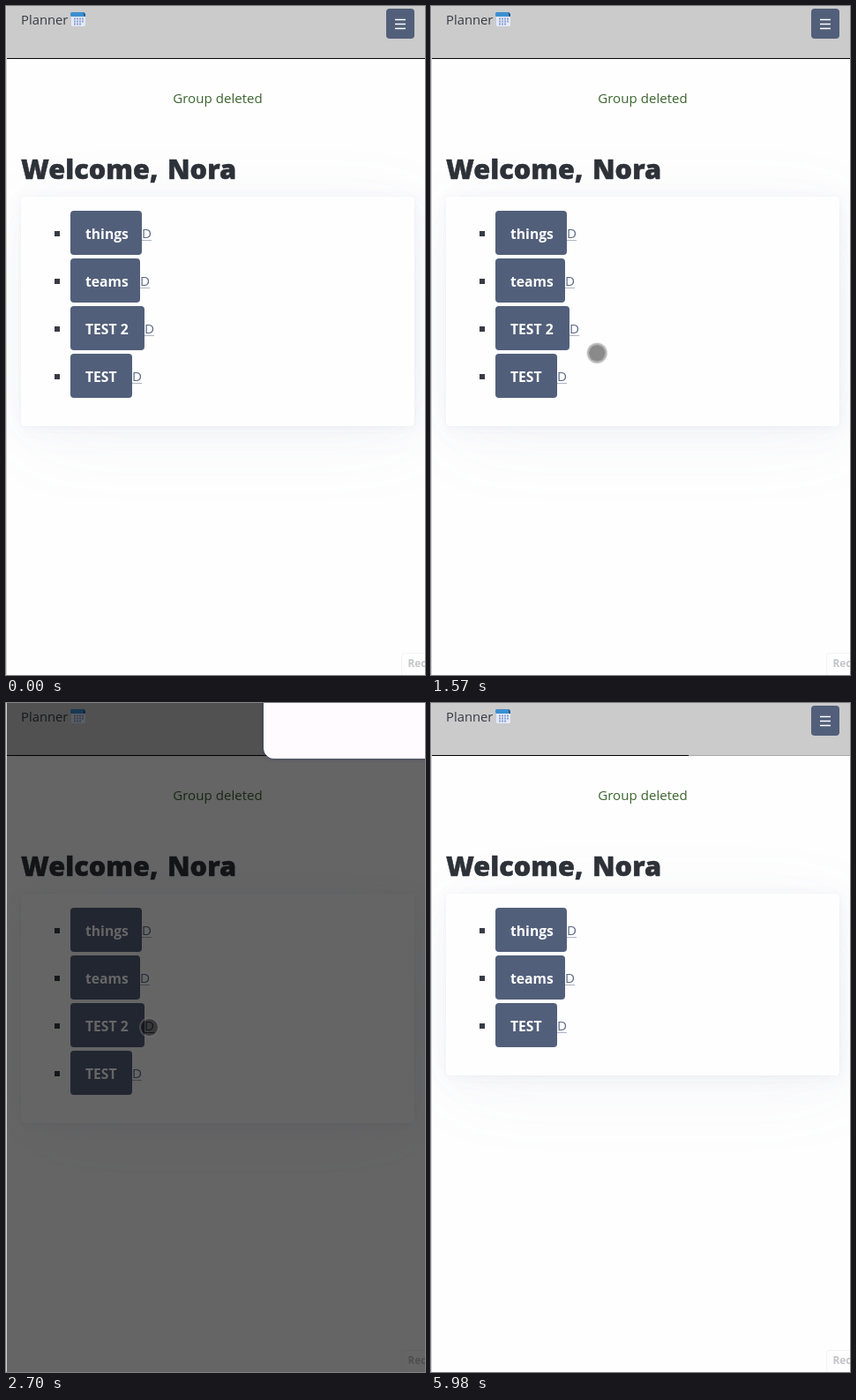
An HTML page that plays this animation: 475x758 px, repeating every 9.18 s.

```html
<!DOCTYPE html>
<html lang="en">
<head>
<meta charset="utf-8">
<title>Planner</title>
<style>
  :root { --loop: 9180ms; }
  html, body { margin: 0; width: 100%; height: 100%; overflow: hidden; }
  body {
    position: relative;
    background: #fefefe;
    color: #373c44;
    font: 15.1px/24px "Open Sans", "Noto Sans", sans-serif;
  }
  body > *, header > *, li > *, li::before, h1 span { position: absolute; }
  h1, ul, p { margin: 0; white-space: nowrap; }

  .edge { left: 0; top: 0; width: 1px; height: 758px; background: #d2d2d2; }
  header { left: 1px; top: 0; width: 474px; height: 59px; background: #cbcbcb; }
  .brand { left: 16px; top: 3px; font-size: 14.8px; }
  .calendar { left: 72px; top: 6px; }
  .menu { left: 430px; top: 3px; width: 32px; height: 34px; border-radius: 4px; background: #525f7a; }
  .menu svg { display: block; }
  .rule { top: 59px; height: 1px; background: #000; }
  .rule.left { left: 0; width: 291px; }
  .rule.right { left: 291px; width: 183px; animation: pale var(--loop) step-end infinite; }

  .notice { left: 1px; width: 478px; top: 92px; text-align: center; color: #3b6530; }
  h1 {
    left: 17px; top: 166px;
    color: #2d3138;
    font-size: 30.7px;
    font-weight: 800;
    line-height: 36px;
    -webkit-text-stroke: .5px #2d3138;
  }
  h1 span { left: 166px; top: 0; }

  ul {
    left: 17px; top: 216px; width: 446px;
    box-sizing: border-box;
    padding: 16px 0 28px;
    list-style: none;
    border-radius: 4px;
    background: #fefefe;
    box-shadow:
      .23px .46px 2.8px rgba(129, 145, 181, .017),
      .54px 1.07px 6.4px rgba(129, 145, 181, .024),
      1px 2px 12px rgba(129, 145, 181, .03),
      1.8px 3.6px 21.6px rgba(129, 145, 181, .036),
      3.3px 6.7px 40px rgba(129, 145, 181, .043),
      8px 16px 96px rgba(129, 145, 181, .06),
      0 0 0 1px rgba(129, 145, 181, .015);
  }
  li { position: relative; height: 54px; }
  li::before { content: ""; left: 38px; top: 23px; width: 6px; height: 6px; background: #373c44; }
  li b {
    left: 56px; top: 0; width: var(--w); height: 50px;
    box-sizing: border-box;
    padding: 14px 0 0 17px;
    border-radius: 4px;
    background: #525f7a;
    color: #fff;
    font-size: 15.7px;
  }
  li u {
    left: calc(56px + var(--w)); top: 13px;
    color: #5d6b89;
    text-decoration-color: rgba(93, 107, 137, .5);
    text-underline-offset: .125em;
  }
  .doomed { animation: remove var(--loop) step-end infinite; }
  .doomed u { animation: hover var(--loop) step-end infinite; }

  .tip {
    left: 448px; top: 733px; width: 40px; height: 30px;
    box-sizing: border-box;
    border: 1px solid #f4f4f5;
    border-radius: 3px;
    padding-left: 6.5px;
    color: #c3c4c8;
    font-size: 11.8px;
    font-weight: 700;
    line-height: 21px;
  }

  .dim {
    left: 1px; top: 0; width: 474px; height: 758px;
    background: #000;
    animation: dim var(--loop) step-end infinite;
  }
  .dialog {
    left: 292px; top: -20px; width: 220px; height: 83px;
    border-radius: 12px;
    background: #fffbff;
    box-shadow: 0 0 4px rgba(40, 50, 100, .7);
    animation: dialog var(--loop) step-end infinite;
  }
  .pointer {
    left: -12px; top: -12px; width: 24px; height: 24px;
    animation: travel var(--loop) infinite, show var(--loop) step-end infinite;
  }
  .pointer i {
    position: absolute; inset: .5px;
    box-sizing: border-box;
    border: 2px solid rgba(112, 112, 112, .48);
    border-radius: 50%;
    background: rgba(10, 10, 10, .47) padding-box;
    animation: click var(--loop) step-end infinite;
  }

  @keyframes pale { 0% { background: #000; } 59.91%, 100% { background: #a6a6ae; } }
  @keyframes remove {
    0% { height: 54px; visibility: visible; }
    65.14%, 100% { height: 0; visibility: hidden; }
  }
  @keyframes hover {
    0%, 65.14%, 100% { color: #5d6b89; text-decoration-color: rgba(93, 107, 137, .5); }
    21.35% { color: #48536b; text-decoration-color: #48536b; }
  }
  @keyframes dim { 0%, 58.6%, 100% { opacity: 0; } 27.12% { opacity: .6; } }
  @keyframes dialog {
    0%, 59.91%, 100% { opacity: 0; transform: none; }
    27.88% { opacity: .35; transform: translateY(-8px); }
    28.64% { opacity: .8; transform: translateY(-3px); }
    29.41% { opacity: 1; transform: none; }
    58.6% { opacity: .95; transform: translateY(-5px); }
    59.25% { opacity: .45; transform: translateY(-9px); }
  }
  @keyframes show { 0%, 36.7%, 100% { visibility: hidden; } 1.3% { visibility: visible; } }
  @keyframes click {
    0%, 27.12%, 100% {
      inset: .5px;
      border-color: rgba(112, 112, 112, .48);
      background-color: rgba(10, 10, 10, .47);
    }
    25.7% {
      inset: 0;
      border-color: rgba(215, 210, 50, .65);
      background-color: rgba(190, 188, 0, .8);
    }
  }
  @keyframes travel {
    0%, 1.3% { transform: translate(436px, 752px); animation-timing-function: steps(3); }
    3.59% { transform: translate(325px, 560px); animation-timing-function: steps(3); }
    5.88% { transform: translate(243px, 442px); animation-timing-function: steps(1); }
    6.64% { transform: translate(232px, 426px); animation-timing-function: steps(2); }
    8.16% { transform: translate(262px, 446px); animation-timing-function: steps(2); }
    9.69%, 11.14% { transform: translate(292px, 468px); animation-timing-function: steps(7); }
    16.25% { transform: translate(200px, 400px); animation-timing-function: steps(4); }
    19.17% { transform: translate(151px, 371px); animation-timing-function: steps(3); }
    21.35%, 30.86% { transform: translate(162px, 367px); animation-timing-function: steps(1); }
    31.58% { transform: translate(188px, 362px); animation-timing-function: steps(1); }
    32.31% { transform: translate(240px, 317px); animation-timing-function: steps(2); }
    33.77% { transform: translate(345px, 266px); animation-timing-function: steps(2); }
    35.23% { transform: translate(427px, 222px); animation-timing-function: steps(1); }
    35.96%, 100% { transform: translate(449px, 188px); }
  }
</style>
</head>
<body>
  <header>
    <span class="brand">Planner</span>
    <svg class="calendar" width="18" height="18">
      <rect x="1" y="3" width="16" height="14" rx="1.5" fill="#e3eaf7"/>
      <path d="M0 5V2.500Q0 1 1.500 1H14.500L17 3.500V6H1Z" fill="#3c8fd0"/>
      <path d="M14.500 1Q16.500 1 17 3.500V6H15.500Z" fill="#23598c"/>
      <path d="M4 8.500H15M4 11.500H15M4 14.500H12" stroke="#8c9fd2" stroke-width="1.800" stroke-dasharray="2 1"/>
    </svg>
    <div class="menu">
      <svg width="32" height="34"><path d="M10 12.500H22M10 17.500H22M10 22.500H22" stroke="#fff" stroke-width="1.400"/></svg>
    </div>
    <div class="rule left"></div>
    <div class="rule right"></div>
  </header>
  <p class="notice">Group deleted</p>
  <ul>
    <li style="--w:81px"><b>things</b><u>D</u></li>
    <li style="--w:79px"><b>teams</b><u>D</u></li>
    <li style="--w:84px" class="doomed"><b>TEST 2</b><u>D</u></li>
    <li style="--w:70px"><b>TEST</b><u>D</u></li>
  </ul>
  <h1>Welcome, <span>Nora</span></h1>
  <div class="tip">Rec</div>
  <div class="dim"></div>
  <div class="dialog"></div>
  <div class="pointer"><i></i></div>
  <div class="edge"></div>
</body>
</html>
```
